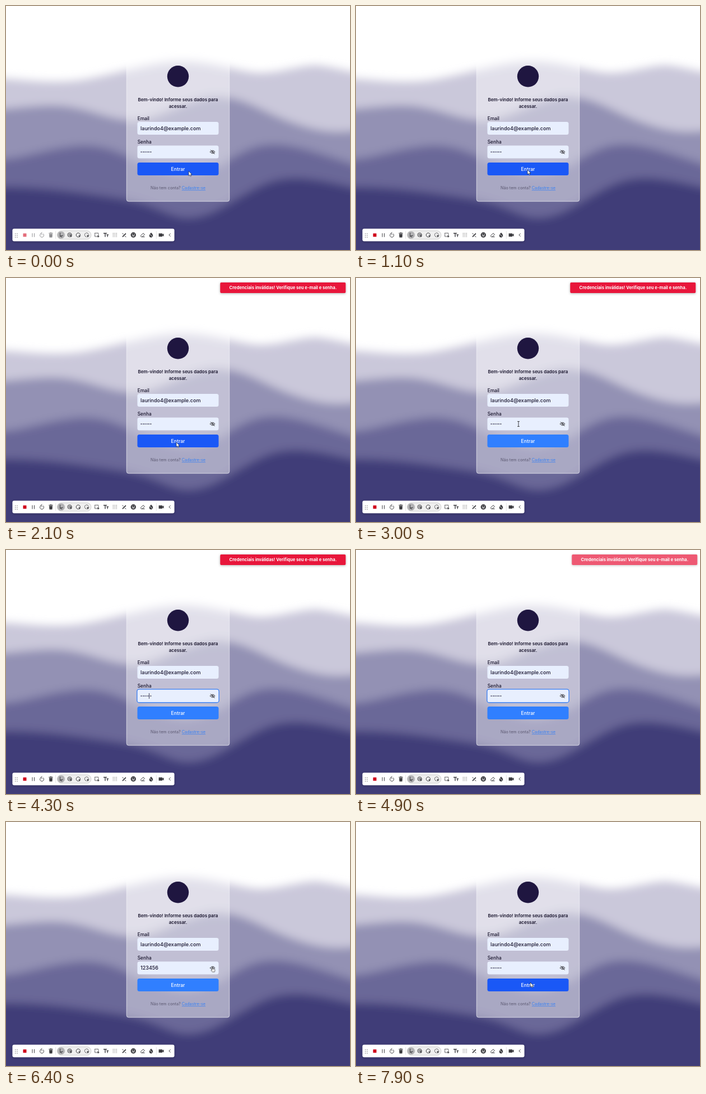
An HTML page for the animation above (8000 ms loop, 614 by 438 pixels).

```html
<!DOCTYPE html>
<html lang="pt-BR">
<head>
<meta charset="utf-8">
<title>Login</title>
<style>
html, body { margin: 0; width: 100%; height: 100%; overflow: hidden; background: #fff; }
svg { display: block; width: 614px; height: 438px; font-family: Inter, "Open Sans", sans-serif; }
text { fill: #17132b; }
.mid { text-anchor: middle; }
.label { font-size: 8.3px; font-weight: 500; }
.value { font-size: 9px; font-weight: 500; }
.field { fill: #e8effe; }
.line { fill: none; stroke: #3c3c40; stroke-width: 1; stroke-linecap: round; stroke-linejoin: round; }
.ink { fill: #3c3c40; }

.btn, .focus, .caret, .dots, .plain, .toast, .rec, .ptr, .arrow, .beam, .hand {
  animation: 8s linear infinite both;
}
.btn { animation-name: btn; }
.focus { animation-name: focus; }
.caret { animation-name: caret; animation-timing-function: step-end; }
.dots { animation-name: dots; animation-timing-function: step-end; }
.plain { animation-name: plain; animation-timing-function: step-end; }
.toast { animation-name: toast; animation-timing-function: ease-in-out; }
.rec { animation-name: rec; }
.ptr { animation-name: ptr; }
.arrow { animation-name: arrow; animation-timing-function: step-end; }
.beam { animation-name: beam; animation-timing-function: step-end; }
.hand { animation-name: hand; animation-timing-function: step-end; }

@keyframes btn {
  0%, 32% { fill: #1a58f6; }
  34%, 93.5% { fill: #307fff; }
  95.5%, 100% { fill: #1a58f6; }
}
@keyframes focus {
  0%, 37.5% { opacity: 0; }
  39.5%, 77.5% { opacity: 1; }
  79%, 100% { opacity: 0; }
}
@keyframes caret {
  0% { opacity: 0; }
  38.75% { opacity: 1; }
  45% { opacity: 0; }
  51.25% { opacity: 1; }
  57.5% { opacity: 0; }
  63.75% { opacity: 1; }
  77.5%, 100% { opacity: 0; }
}
@keyframes dots {
  0% { opacity: 1; }
  78.75% { opacity: 0; }
  88.75%, 100% { opacity: 1; }
}
@keyframes plain {
  0% { opacity: 0; }
  78.75% { opacity: 1; }
  88.75%, 100% { opacity: 0; }
}
@keyframes toast {
  0%, 19.5% { opacity: 0; transform: translateX(10px); }
  25%, 59.4% { opacity: 1; transform: none; }
  64.4%, 100% { opacity: 0; transform: translateX(10px); }
}
@keyframes rec {
  0%, 6.25% { opacity: .58; }
  8.75%, 100% { opacity: 1; }
}
@keyframes ptr {
  0%, 6% { transform: translate(326px, 296.5px); }
  13.75%, 20% { transform: translate(306px, 294px); }
  23.75%, 31% { transform: translate(304px, 295px); }
  35%, 73.75% { transform: translate(290px, 262px); }
  78%, 91.24% { transform: translate(368.5px, 260.5px); }
  91.25%, 93.75% { transform: translate(317px, 284px); }
  96.25%, 98.74% { transform: translate(305.5px, 294px); }
  98.75%, 100% { transform: translate(311px, 288px); }
}
@keyframes arrow {
  0% { opacity: 1; }
  33.5% { opacity: 0; }
  93.75%, 100% { opacity: 1; }
}
@keyframes beam {
  0% { opacity: 0; }
  33.5% { opacity: 1; }
  38.75% { opacity: 0; }
  73.75% { opacity: 1; }
  77.5%, 100% { opacity: 0; }
}
@keyframes hand {
  0% { opacity: 0; }
  77.5% { opacity: 1; }
  91.25%, 100% { opacity: 0; }
}
</style>
</head>
<body>
<svg viewBox="0 0 614 438">
  <defs>
    <filter id="soft" x="-10%" y="-10%" width="120%" height="120%"><feGaussianBlur stdDeviation="8"/></filter>
    <filter id="glass" x="-10%" y="-10%" width="120%" height="120%"><feGaussianBlur stdDeviation="5"/></filter>
    <filter id="shade" x="-10%" y="-30%" width="120%" height="180%">
      <feDropShadow dx="0" dy="1" stdDeviation="2" flood-color="#000" flood-opacity=".3"/>
    </filter>
    <linearGradient id="edge" x1="0" y1="90" x2="0" y2="351" gradientUnits="userSpaceOnUse">
      <stop stop-color="#fff" stop-opacity=".3"/>
      <stop offset="1" stop-color="#fff" stop-opacity=".55"/>
    </linearGradient>
    <clipPath id="card"><rect x="215" y="85" width="184" height="266" rx="4"/></clipPath>
    <g id="waves">
      <rect x="-40" y="-40" width="694" height="520" fill="#fff"/>
      <g filter="url(#soft)">
        <path fill="#cac8da" d="M-40 128C40 132 90 142 150 130S250 104 300 100S400 113 440 119S530 103 560 107S620 120 654 124V480H-40Z"/>
        <path fill="#9391b4" d="M-40 186C20 186 70 172 120 182S190 205 230 205S340 155 390 163S460 192 520 212S600 225 654 222V480H-40Z"/>
        <path fill="#6a6798" d="M-40 275C20 280 50 260 120 252S220 278 290 298S400 264 450 252S550 262 654 295V480H-40Z"/>
        <path fill="#3f3c78" d="M-40 325C60 322 130 335 200 345S290 382 330 380S400 350 450 325S540 305 654 335V480H-40Z"/>
      </g>
    </g>
  </defs>

  <use href="#waves"/>
  <g clip-path="url(#card)">
    <use href="#waves" filter="url(#glass)"/>
    <rect x="215" y="85" width="184" height="266" fill="#fff" fill-opacity=".42"/>
  </g>
  <rect x="215.2" y="85.5" width="183.6" height="265.3" rx="4" fill="none" stroke="url(#edge)"/>

  <circle cx="307" cy="126.3" r="19.2" fill="#1f1640"/>
  <g class="mid" font-size="8" font-weight="600">
    <text x="307" y="171.2">Bem-vindo! Informe seus dados para</text>
    <text x="307" y="183">acessar.</text>
  </g>

  <text class="label" x="234.7" y="205">Email</text>
  <rect class="field" x="234.5" y="208" width="145" height="23" rx="3.5"/>
  <text class="value" x="240" y="222.5">laurindo4@example.com</text>

  <text class="label" x="234.7" y="247.3">Senha</text>
  <rect class="field" x="234.5" y="250.5" width="145" height="23" rx="3.5"/>
  <g class="focus" fill="none">
    <rect x="233.8" y="249.8" width="146.4" height="24.2" rx="4" stroke="#3b82f6" stroke-width="1.3"/>
  </g>
  <text class="dots" x="239.8" y="264.2" font-size="6">••••••</text>
  <text class="plain value" x="240" y="265.2" font-size="8.4">123456</text>
  <path class="caret" d="M255.5 257V267" stroke="#17132b" stroke-width=".8"/>
  <g class="line" stroke-width=".9">
    <path d="M364.6 262C366.6 258.4 370.8 258.4 372.8 262C370.8 265.6 366.6 265.6 364.6 262Z"/>
    <circle cx="368.7" cy="262" r="1.3"/>
    <path class="dots" d="M365.3 258.6L372.3 265.6"/>
  </g>

  <rect class="btn" x="234.5" y="281" width="145" height="23" rx="3.5"/>
  <text class="mid" x="307" y="295.6" font-size="8.6" font-weight="500" style="fill:#fff">Entrar</text>

  <text class="mid" x="307" y="329.4" font-size="7.25" style="fill:#5b5870">Não tem conta? <tspan fill="#3580f6" text-decoration="underline">Cadastre-se</tspan></text>

  <g class="toast">
    <rect x="382.3" y="8" width="224" height="19" rx="2" fill="#e8143a" filter="url(#shade)"/>
    <text class="mid" x="494.4" y="19.8" font-size="7.6" font-weight="700" style="fill:#fff">Credenciais inválidas! Verifique seu e-mail e senha.</text>
  </g>

  <rect x="11.5" y="399.7" width="289" height="22.6" rx="3" fill="#fff" filter="url(#shade)"/>
  <path d="M16.7 408V416M20 408V416" stroke="#999" stroke-width="1.4" stroke-dasharray="1.4 1.9"/>
  <g class="rec">
    <rect x="30.5" y="408.2" width="6" height="6" rx=".5" fill="#d0021b"/>
    <path class="line" stroke-width="1.5" d="M47 408.3V414.3M50.6 408.3V414.3"/>
    <path class="line" d="M62.2 408.6A3.5 3.5 0 1 0 66.2 408.8M64.2 406.2L62 408.4L64.6 410"/>
    <path class="ink" d="M77 409.2H83L82.5 415.4H77.5ZM76.4 407.2H78.6L79 406.5H81L81.4 407.2H83.6V408.4H76.4Z"/>
  </g>
  <path d="M88.7 404V418M268.3 404V418" stroke="#ddd" stroke-width=".8"/>
  <rect x="91.3" y="403.6" width="60.6" height="15" rx="7.5" fill="#efefef" stroke="#c4c4c4" stroke-width=".8"/>
  <circle cx="98.4" cy="411" r="6.6" fill="#b2b2b4"/>
  <path class="line" d="M96.6 407.4V414L98.2 412.6L99.5 415.2M98.2 412.6L101 412.3Z"/>
  <g class="line">
    <circle cx="113.6" cy="410.8" r="3.6"/><circle cx="113.6" cy="410.8" r="1.5"/>
    <path d="M131.2 414A3.7 3.7 0 1 1 132.6 411.2"/>
    <path stroke-dasharray="1.4 1.4" d="M145.5 414A3.5 3.5 0 1 1 147.4 411.2"/>
    <rect x="158.7" y="407.7" width="6.2" height="6.2" stroke-dasharray="1.2 1.3"/>
    <path d="M191.3 407.5V414.5M194.3 407.5V414.5M197.3 407.5V414.5" stroke="#999" stroke-dasharray="1 1.3"/>
    <path stroke-width="1.8" d="M208.4 413.8L213.4 408.8"/>
    <path d="M207.8 408.3L209.4 409.4M212.4 413.4L214 414.4"/>
    <path d="M240.6 412.2L244.8 407.8L247.4 410.2L243.2 414.4H241.8ZM243.4 414.4H247.2"/>
    <path d="M293.3 408.6L290.9 411L293.3 413.4"/>
  </g>
  <path class="ink" d="M113.9 411.2L118.4 413L116.6 413.8L116 415.6ZM129.4 411L133.8 412.8L132 413.6L131.3 415.4ZM144.2 410.8L148.8 412.7L147 413.5L146.2 415.4ZM162.8 411.8L167 413.6L165.3 414.3L164.5 416Z"/>
  <path class="ink" d="M174 407.3H180V408.7H177.7V414.6H176.3V408.7H174ZM179.3 410H183.2V411.2H181.9V414.6H180.6V411.2H179.3Z"/>
  <circle class="ink" cx="227.3" cy="411" r="4.7"/>
  <g fill="#fff"><circle cx="225.6" cy="409.6" r=".8"/><circle cx="229" cy="409.6" r=".8"/><path d="M224.5 411.8H230.1A2.9 2.4 0 0 1 224.5 411.8Z"/></g>
  <path class="ink" d="M259 406.8C261 409 262.2 410.4 262.2 412.2A3.2 3.2 0 0 1 255.8 412.2C255.8 410.4 257 409 259 406.8Z"/>
  <path d="M255.4 408L262 415" stroke="#fff" stroke-width=".9"/>
  <path class="ink" d="M272.6 408.2H279.2V410.2L281.6 408.4V413.8L279.2 412V414H272.6Z"/>

  <g class="ptr">
    <path class="arrow" d="M0 0V8.2L1.9 6.5L3.2 9.3L4.6 8.7L3.4 6H6Z" fill="#fff" stroke="#111" stroke-width=".6"/>
    <path class="beam line" stroke-width=".8" d="M-1.5 -4.5H1.5M0 -4.5V4.5M-1.5 4.5H1.5"/>
    <path class="hand" d="M-.8 .4Q0 -.6 .7 .4V3L3.6 3.7Q4.6 4 4.4 5.2L3.8 8.6H-.2L-2.4 5.8Q-2.4 4.6 -.8 5.4Z" fill="#fff" stroke="#222" stroke-width=".7"/>
  </g>
</svg>
</body>
</html>
```
